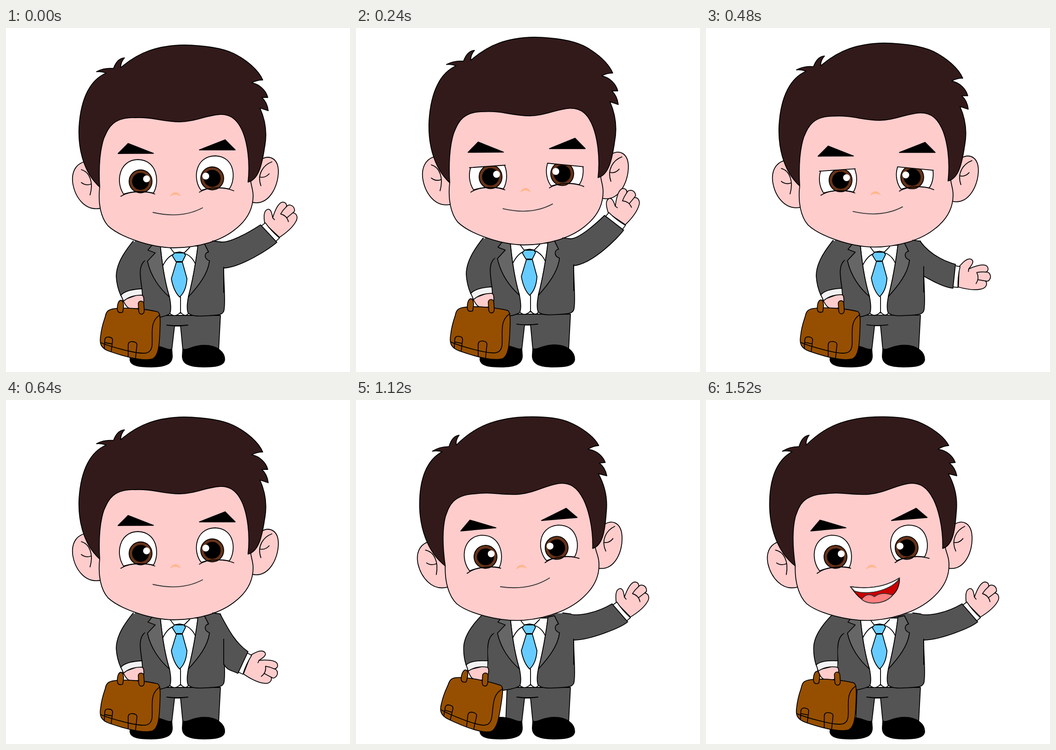
Animation of 749 by 748 pixels, one loop 3.76 s. Source, as an HTML page:

```html
<!DOCTYPE html>
<html lang="en">
<head>
<meta charset="utf-8">
<title>Waving businessman</title>
<style>
  html, body { margin: 0; height: 100%; overflow: hidden; background: #fff; }
  svg { display: block; width: 100vw; height: 100vh; }
  path, circle { stroke: #000; stroke-width: 1.8; stroke-linejoin: round; stroke-linecap: round; }
  .suit { fill: #545454; }
  .lapel { fill: #666; }
  .skin { fill: #fcc; }
  .white { fill: #fff; }
  .cuff { fill: #f2f2f2; }
  .hair { fill: #331a1a; }
  .iris { fill: #663319; }
  .tie { fill: #6cf; }
  .bag { fill: #964f00; }
  .line { fill: none; }
  .flat { stroke: none; }
</style>
</head>
<body>
<svg viewBox="0 0 749 748">
  <g id="figure">
    <!-- legs -->
    <path class="suit" d="M329 625H467L463 700H385L380 648H367L361 700H326Z"/>
    <path class="line" d="M350 646Q372 649 396 646"/>
    <path id="shoe" d="M385 698C396 702 405 690 432 690C460 690 477 705 476 722C474 735 455 737 430 737C398 737 383 730 384 712Z"/>
    <use href="#shoe" transform="translate(746 0) scale(-1 1)"/>

    <!-- jacket -->
    <path class="suit flat" d="M280 462L468 464L474 520C474 560 478 590 475 612C474 622 466 624 450 625C430 626 408 629 398 621L356 622C345 628 330 630 316 632H288V500Z"/>
    <path class="line" d="M474 520C474 560 478 590 475 612C474 622 466 624 450 625C430 626 408 629 398 621M356 622C345 628 330 630 316 632"/>

    <!-- arm with briefcase -->
    <g id="carryArm">
      <path class="suit" d="M277 463C255 490 240 515 240 540C241 560 246 573 250 582L296 567C292 540 288 518 302 506"/>
      <path class="suit flat" d="M301 507L306 478L278 464L262 500Z"/>
      <path class="skin" d="M254 592C260 600 262 610 275 611C290 612 302 605 300 590C300 582 297 580 290 579Z"/>
      <path class="cuff" d="M250 581C258 572 275 568 296 567L297 581C283 580 267 584 256 594Z"/>
      <g id="bag">
        <path class="bag" d="M232 611C260 606 310 612 330 617C337 620 336 640 335 660C334 690 332 712 320 719C300 726 260 715 225 703C208 697 203 688 206 670C208 650 212 640 216 628C218 617 222 613 232 611Z"/>
        <path class="line" d="M335 624C312 638 320 665 318 690C316 711 300 710 265 702C240 696 220 690 206 684"/>
        <path class="line" d="M214 697L215 680Q215 671 224 672Q233 673 232 680L229 704M215 684L231 687M266 714L266 690Q266 681 276 682Q286 683 285 690L282 718"/>
        <path class="bag" d="M243 615C241 605 244 593 250 592C257 593 257 606 254 618Q246 621 243 615Z"/>
        <path class="bag" d="M288 599C289 592 300 592 300 600L301 615C300 625 290 624 289 616Z"/>
      </g>
    </g>

    <!-- shirt, tie, lapels -->
    <path class="white" d="M336 474H418C412 520 405 555 397 585C394 600 393 612 397 621Q390 630 380 618Q368 631 357 621C360 612 359 600 356 585C345 550 340 515 336 474Z"/>
    <path class="line" d="M380 585V618M342 516C350 500 360 492 372 490M388 490C402 494 411 507 414 518M357 477L366 489L378 487L388 489L400 477"/>
    <path class="tie" d="M367 489H387L391 494L384 508H370L362 495Z"/>
    <path class="tie" d="M371 509L360 545C363 562 368 575 378 585C388 576 393 562 394 545L384 509Z"/>
    <path class="lapel" d="M336 474L318 472L309 483L325 489L308 507C315 540 335 567 356 585C345 550 340 515 336 474Z"/>
    <path class="lapel" d="M418 472L432 469L441 487C431 489 431 502 443 506C440 535 418 562 397 585C405 555 412 520 418 472Z"/>

    <g id="head">
      <path class="skin" d="M555 286C575 274 593 285 593 312C593 345 572 387 536 379L520 330Z"/>
      <path class="line" d="M579 291C560 298 546 318 555 343M552 324Q564 327 573 317"/>
      <path class="skin" d="M170 291C150 297 143 315 145 335C149 365 170 399 206 392L215 340Z"/>
      <path class="line" d="M164 308C182 313 191 335 183 363M164 336Q174 344 186 339"/>
      <path class="skin" d="M204 346C200 380 206 412 222 430C245 452 310 477 365 478C420 478 470 462 500 437C528 415 538 390 538 365C538 350 533 342 533 332L540 250L500 150H250L190 250Z"/>
      <path class="hair" d="M204 346C165 310 157 255 159 215C163 150 185 112 218 98Q208 94 197 95Q214 86 234 88Q242 66 258 65Q249 75 250 86C290 52 330 38 388 37C440 38 473 45 495 55C525 70 550 92 559 113Q546 113 535 119C553 123 566 136 570 151L557 151Q569 162 571 180L553 174C567 205 568 235 563 260C557 300 549 330 527 335C532 290 525 250 516 227C505 200 490 187 465 188C435 190 410 204 378 204C340 204 320 193 280 195C230 194 222 220 213 240C203 270 202 310 204 346Z"/>

      <path class="white" d="M256 361C238 335 246 287 287 286C330 287 335 335 321 359C300 354 275 355 256 361Z"/>
      <circle class="iris" cx="293" cy="333.500" r="25"/>
      <circle cx="293" cy="333.500" r="17.500"/>
      <circle class="white flat" cx="306" cy="328" r="7.500"/>
      <path class="line" d="M250 366C270 353 305 354 324 361"/>

      <path class="white" d="M425 353C406 330 411 279 455 278C500 279 501 330 486 350C465 345 442 347 425 353Z"/>
      <circle class="iris" cx="449" cy="327" r="25"/>
      <circle cx="449" cy="327" r="17.500"/>
      <circle class="white flat" cx="435" cy="322" r="7.500"/>
      <path class="line" d="M421 357C440 345 475 345 496 354"/>

      <g id="lids">
        <path class="skin flat" d="M243 314L330 308.500V280H243Z"/>
        <path class="skin flat" d="M410 304L500 312.500V272H410Z"/>
        <path class="line" d="M247 314L325 308.700M417 304.500L495 312"/>
      </g>
      <path id="brows" d="M244 273L266 251L321 272.500ZM421 265L477 243L499 265Z"/>
      <path class="flat" fill="#ffb78c" d="M357 367C362 354 376 354 381 367C374 361 364 361 357 367Z"/>
      <path class="line" style="stroke:#333" d="M320 401C350 408 390 411 428 391"/>
      <g id="openMouth">
        <path fill="#c00" d="M320 401C350 408 390 411 428 391C427 408 419 420 410 427C392 445 355 445 341 429C332 421 326 411 320 401Z"/>
        <path class="white" style="stroke:#333" d="M320 401C350 408 390 411 428 391C415 413 360 425 328 411Z"/>
        <path style="stroke:#333" fill="#ff8080" d="M342 430Q356 415 370 427Q386 416 410 427C392 445 355 445 342 430Z"/>
      </g>
    </g>

    <!-- waving arm -->
    <g id="hand">
      <path class="skin" d="M9-23C18-36 26-45 35-42C43-38 36-28 31-20C45-28 62-36 71-31C78-25 74-18 70-17C80-19 85-8 80 0Q78 4 72 3C78 10 74 19 64 22C50 27 30 26 12 23Z"/>
      <path class="line" d="M31-20L31-14M70-17Q60-17 50-14Q58-2 51 11M72 3L55 2"/>
      <path class="white" d="M-2-24L11-23Q8 0 11 24H-2Z"/>
    </g>
    <path id="sleeve" class="suit"/>
    <path class="line" d="M474 520V575"/>
  </g>
</svg>
<script>
const STEP = 80, LOOP = 3760;
const $ = id => document.getElementById(id);

// Key lists hold [step, value, ...] and are read linearly.
const keys = {
  stretch: [[0, 0], [3, 1], [7, 0]],
  tilt: [[11, 0], [14, 1], [16.5, 0.6], [19, 1]],
  swing: [[14, 0], [19, -6.5]],
  // distance and angle of the wrist from the shoulder, angle of the hand
  arm: [[0, 110.7, -22.9, -43], [3, 109.3, -32.7, -53], [6, 87, 36, 6], [7, 93, 60.4, 25],
        [11, 93, 60.4, 25], [12, 90, 34.6, 4], [14, 108, -14.6, -41], [16.5, 109, -19, -43], [19, 108, -14.6, -41]]
};

function at(list, step) {
  const i = list.findIndex(key => key[0] >= step);
  if (i < 0) return list[list.length - 1].slice(1);
  if (i === 0) return list[0].slice(1);
  const a = list[i - 1], b = list[i], f = (step - a[0]) / (b[0] - a[0]);
  return a.slice(1).map((v, n) => v + (b[n + 1] - v) * f);
}

const move = (p, degrees, length) => {
  const r = degrees * Math.PI / 180;
  return [p[0] + length * Math.cos(r), p[1] + length * Math.sin(r)];
};
const place = (id, transform) => $(id).setAttribute('transform', transform);
const show = (id, on) => { $(id).style.display = on ? '' : 'none'; };

function drawArm([reach, angle, turn]) {
  const wrist = move([470, 490], angle, reach);
  const top = move(wrist, turn - 90, 26), bottom = move(wrist, turn + 90, 26);
  const pitY = 522 + 0.0143 * Math.max(0, angle) ** 2;
  place('hand', `translate(${wrist}) rotate(${turn}) scale(.96)`);
  $('sleeve').setAttribute('d',
    `M450 463L466 465C484 ${477 + 0.35 * angle} ${move(top, turn + 10, -35)} ${top}L${bottom}` +
    `C${move(bottom, turn, -20)} ${504 - 0.33 * angle} ${pitY + 3 + 0.2 * angle} 474 ${pitY}`);
}

function draw(time) {
  const step = Math.floor(time % LOOP / STEP);
  const [stretch] = at(keys.stretch, step), [tilt] = at(keys.tilt, step), [swing] = at(keys.swing, step);
  const squint = step >= 1 && step <= 7;
  place('figure', `translate(0 737) scale(1 ${1 + 0.0243 * stretch}) translate(0 -737)`);
  place('head', `rotate(${-4.8 * tilt} 377 469)`);
  place('carryArm', `rotate(${6.5 * tilt} 290 490)`);
  place('bag', `rotate(${swing} 275 566)`);
  place('brows', `translate(0 ${squint ? 8.5 : 0})`);
  show('lids', squint);
  show('openMouth', step >= 19);
  drawArm(at(keys.arm, step));
}

const start = performance.now();
function tick() {
  draw(performance.now() - start);
  requestAnimationFrame(tick);
}
tick();
</script>
</body>
</html>
```
